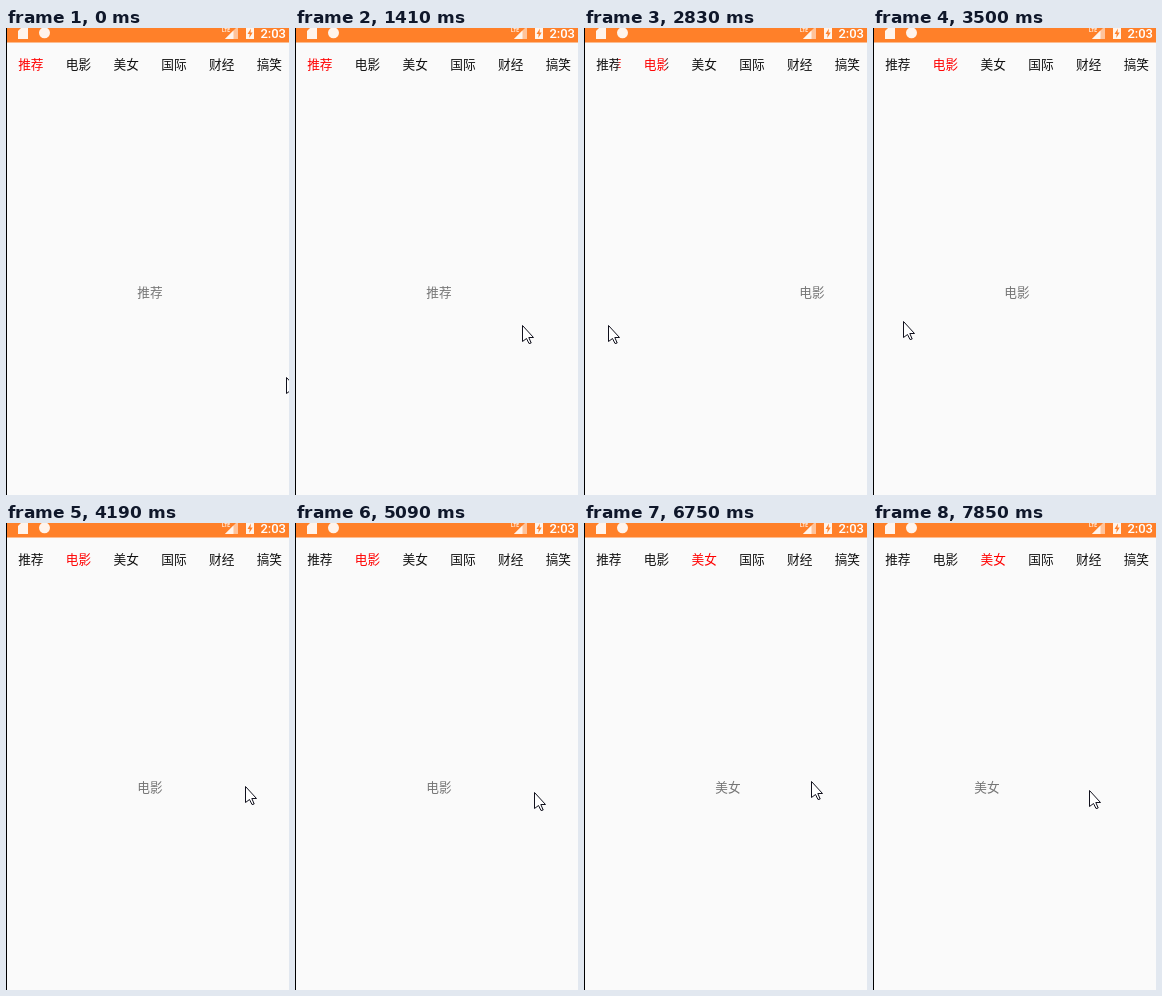
These frames come from a looping animation (283 px wide and 467 px high, 8000 ms). An HTML page with a canvas:

```html
<!DOCTYPE html>
<html lang="zh-CN">
<head>
<meta charset="utf-8">
<style>
html, body { margin: 0; width: 283px; height: 467px; overflow: hidden; background: #fafafa; }
canvas { display: block; }
</style>
</head>
<body>
<canvas id="stage" width="283" height="467"></canvas>
<script>
const ctx = document.getElementById('stage').getContext('2d');
const LOOP = 8000, PAGE = 287, TAB = 47.7, LEFT = 1;
const TITLES = ['推荐', '电影', '美女', '国际', '财经', '搞笑'];
const CJK = '500 12.7px "Noto Sans CJK SC", "Noto Sans CJK", "Noto Sans CJK JP", sans-serif';
const SWIPE = 224, SETTLE = 200, TICK = 135;

const clamp = v => Math.max(0, Math.min(1, v));
const mix = (a, b, f) => a + (b - a) * f;
const easeOut = (f, power) => 1 - (1 - f) ** power;

// pointer strokes: a swipe drags the pager, a hover only moves the arrow
const swipe = (start, end, x, y) =>
  ({ start, end, from: [x, y], to: [x - SWIPE, y], ease: f => f ** 0.8, lift: 0, drags: true });
const hover = (start, end, from, to, lift = 0) =>
  ({ start, end, from, to, ease: f => easeOut(f, 2.5), lift });

const STROKES = [
  hover(50, 850, [280, 349], [237, 297]),
  swipe(1410, 3010, 227, 297),
  hover(3450, 4580, [3, 297], [258, 270], 10),
  swipe(5090, 5893, 239, 269),
  hover(6080, 7150, [15, 269], [251, 267], 10),
  hover(7200, 7430, [251, 267], [272, 260]),
  swipe(7730, 9211, 246, 267)
];

// the screen refreshes in short bursts of even ticks
const BURSTS = [
  [150, 850], [1410, 2400], [2550, 3500], [3650, 4580],
  [5090, 6000], [6150, 7150], [7300, 7430], [7730, 7850]
];

function snap(t) {
  const burst = BURSTS.filter(b => t >= b[0]).pop();
  if (!burst) return 0;
  const [a, b] = burst, step = (b - a) / Math.round((b - a) / TICK);
  return Math.min(b, a + Math.floor((t - a + 12) / step) * step);
}

const progress = (s, t) => clamp((t - s.start) / (s.end - s.start));

function pointer(t) {
  const s = STROKES.filter(k => t >= k.start).pop() || STROKES[0];
  const f = progress(s, t), e = s.ease(f);
  return [
    Math.round(mix(s.from[0], s.to[0], e)),
    Math.round(mix(s.from[1], s.to[1], e) - s.lift * Math.sin(Math.PI * f))
  ];
}

// each swipe drags part of a page, then the pager settles on the next one
function position(t) {
  return STROKES.filter(s => s.drags).reduce((sum, s) => {
    const dragged = s.ease(progress(s, t)) * SWIPE / PAGE;
    return sum + mix(dragged, 1, easeOut(clamp((t - s.end) / SETTLE), 3));
  }, 0);
}

function shape(points, fill, stroke) {
  ctx.beginPath();
  points.forEach(([x, y]) => ctx.lineTo(x, y));
  ctx.closePath();
  ctx.fillStyle = fill;
  ctx.fill();
  if (stroke) {
    ctx.strokeStyle = stroke;
    ctx.lineWidth = 1;
    ctx.stroke();
  }
}

function rect(x, y, w, h, color) {
  ctx.fillStyle = color;
  ctx.fillRect(x, y, w, h);
}

function text(str, x, y, font, color, align = 'center') {
  ctx.font = font;
  ctx.fillStyle = color;
  ctx.textAlign = align;
  ctx.fillText(str, x, y);
}

function statusBar() {
  const bar = '#ff8029', ink = '#fff4ec';
  rect(0, 0, 283, 14.5, bar);
  // memory card
  shape([[15, 0], [22, 0], [22, 11], [12, 11], [12, 3]], ink);
  // notification dot
  ctx.beginPath();
  ctx.arc(38.5, 4.8, 5.5, 0, Math.PI * 2);
  ctx.fillStyle = ink;
  ctx.fill();
  // signal
  shape([[219, 11], [232, 11], [232, -2]], '#ffc39a');
  shape([[219, 11], [227.5, 11], [227.5, 2.5]], ink);
  text('LTE', 216, 4, 'bold 5px Roboto, sans-serif', ink, 'left');
  // battery
  rect(240, 0, 8, 11, ink);
  shape([[245, 0.5], [241.5, 6], [243.7, 6], [243.2, 10], [246.7, 4.6], [244.5, 4.6]], bar);
  text('2:03', 280, 10, '500 13px Roboto, sans-serif', '#fff', 'right');
}

function tabs(color, from, to) {
  ctx.save();
  ctx.beginPath();
  ctx.rect(from, 15, to - from, 45);
  ctx.clip();
  TITLES.forEach((s, i) => text(s, LEFT + (i + 0.5) * TAB, 41, CJK, color));
  ctx.restore();
}

function arrow(x, y) {
  const outline = [[0, 0], [0, 16], [4, 13], [6.5, 18], [8.7, 17.5], [6.3, 12], [11, 12]];
  shape(outline.map(([a, b]) => [x + a + 0.5, y + b + 0.5]), '#fff', '#10101c');
}

function draw(time) {
  const t = snap(time), p = position(t), red = LEFT + p * TAB;
  rect(0, 0, 283, 467, '#fafafa');
  statusBar();
  tabs('#111', 0, red);
  tabs('#f00', red, red + TAB);
  tabs('#111', red + TAB, 283);
  TITLES.forEach((s, i) => {
    if (Math.abs(i - p) < 1) text(s, 144 + Math.round((i - p) * PAGE), 269, CJK, '#757575');
  });
  rect(0, 0, 1, 467, '#000');
  arrow(...pointer(t));
}

const begin = performance.now();
function frame() {
  draw((performance.now() - begin) % LOOP);
  requestAnimationFrame(frame);
}
frame();
</script>
</body>
</html>
```
